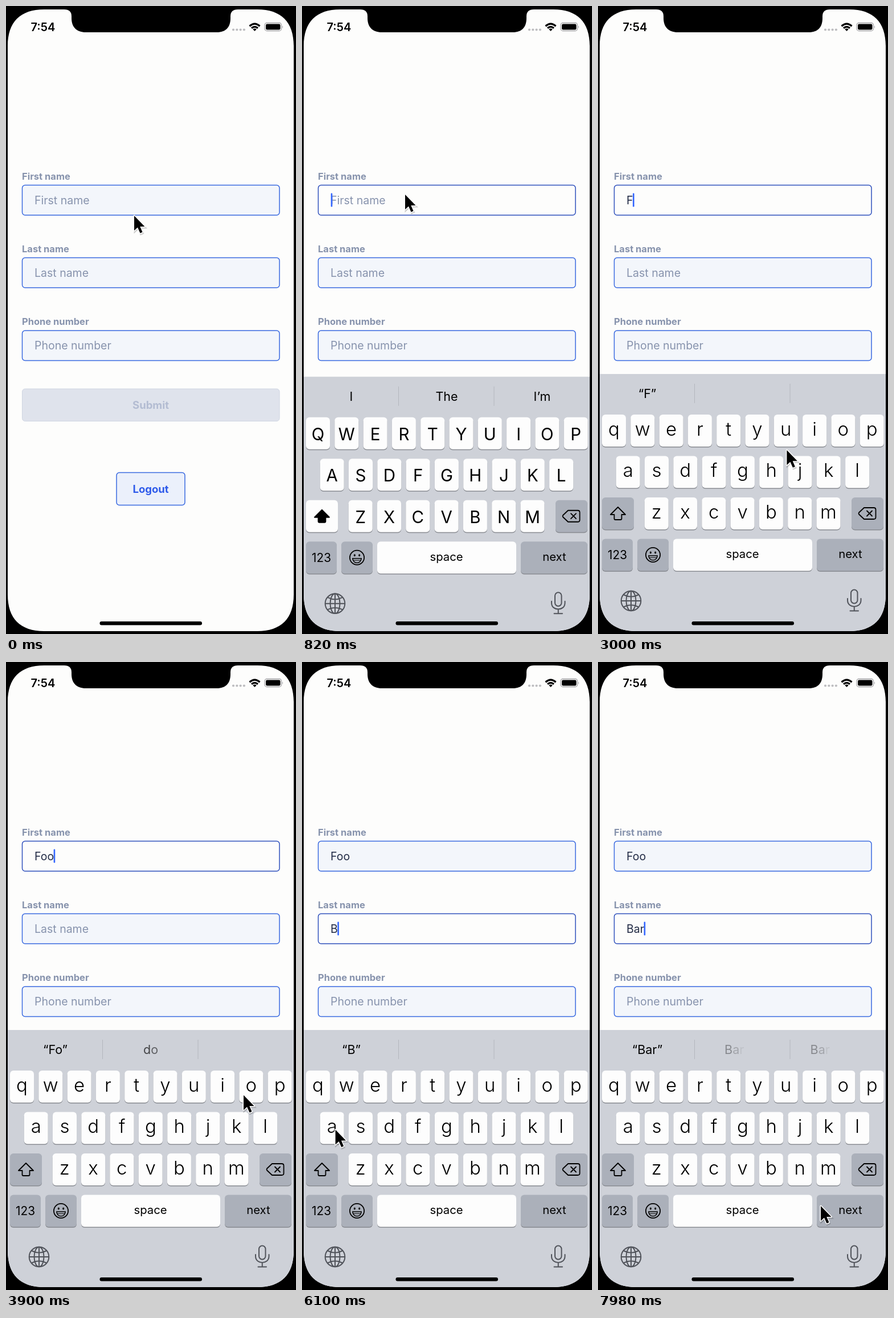
Write an HTML page that moves like this. It is 509 px wide and 1099 px high and loops after 8000 ms.

```html
<!DOCTYPE html>
<html lang="en">
<head>
<meta charset="utf-8">
<title>Form with keyboard</title>
<style>
  html, body { margin: 0; width: 100%; height: 100%; overflow: hidden; background: #000; }
  svg { display: block; width: 100vw; height: 100vh; }
  text { font-family: Inter, "Liberation Sans", sans-serif; white-space: pre; }
  .mid { text-anchor: middle; }
</style>
</head>
<body>
<svg id="stage" viewBox="0 0 509 1099"></svg>
<script>
const LOOP = 8000;
const FOCUS_FIRST = 460, FOCUS_LAST = 4600;
const PAPER = '#fdfdfc', KEY = '#fdfdfd', DARK_KEY = '#abb0ba';
const BLUE = '#3a6ae0', FOCUS_BLUE = '#2f50bc', MUTED = '#8793ad';

// [time, text]
const FIRST_TYPED = [[0, ''], [2550, 'F'], [3380, 'Fo'], [3760, 'Foo']];
const LAST_TYPED = [[0, ''], [5480, 'B'], [6280, 'Ba'], [7460, 'Bar']];

// One list per suggestion slot
const SUGGESTIONS = [
  [[0, 'I'], [2650, '“F”'], [3580, '“Fo”'], [4020, '“Foo”'], [4620, 'I'], [5600, '“B”'], [6500, '“Ba”'], [7600, '“Bar”']],
  [[0, 'The'], [2650, ''], [3800, 'do'], [4020, 'food'], [4620, 'The'], [5600, ''], [6500, 'Ha'], [7500, ''], [7930, 'Barely']],
  [[0, 'I’m'], [2650, ''], [4020, 'foot'], [4620, 'I’m'], [5600, ''], [7930, 'Barbecue']]
];

// [time, x, y] of the pointer tip
const POINTER = [
  [0, 225, 367], [350, 181, 330], [1050, 181, 330], [1750, 206, 867], [2160, 205, 853],
  [2420, 203, 819], [2700, 203, 819], [3250, 428, 746], [3760, 428, 746], [3900, 417, 758],
  [4450, 438, 963], [4700, 438, 963], [5260, 310, 879], [5400, 305, 887], [5600, 305, 887],
  [6150, 53, 817], [6400, 53, 817], [6920, 129, 770], [7200, 178, 743], [7520, 178, 743],
  [7980, 391, 952]
];

const clamp = v => Math.max(0, Math.min(1, v));
const latest = (list, t) => list.reduce((found, item) => item[0] <= t ? item : found);
const attrs = o => Object.entries(o).map(([k, v]) => `${k}="${v}"`).join(' ');
const rect = (x, y, width, height, rx, more = {}) => `<rect ${attrs({ x, y, width, height, rx, ...more })}/>`;
const text = (x, y, size, content, more = {}) =>
  `<text ${attrs({ x, y, 'font-size': size, ...more })}>${content}</text>`;
const centered = (x, y, size, content, more = {}) => text(x, y, size, content, { class: 'mid', ...more });

function key(x, y, width, fill = KEY, id = '') {
  return rect(x, y + 1.4, width, 56, 6, { fill: '#898c92' }) + rect(x, y, width, 56, 6, { fill, id });
}

function field(id, label, y) {
  return text(28, y - 9.5, 16.5, label, { fill: MUTED, 'font-weight': 700 }) +
    rect(28.5, y + .5, 451.5, 52.5, 5, { id: id + 'Box', 'stroke-width': 1.5 }) +
    text(50, y + 33.8, 19.5, label, { id: id + 'Text' }) +
    rect(50.5, y + 14.5, 2.6, 24, 1.3, { id: id + 'Caret', fill: '#3366ff' });
}

const KEY_ROWS = [['qwertyuiop', 7, 715], ['asdfghjkl', 31.7, 787.5], ['zxcvbnm', 81.7, 860]];
const eachKey = draw => KEY_ROWS.map(([letters, x, y]) =>
  [...letters].map((letter, i) => draw(letter, x + i * 50.3, y)).join('')).join('');

function keyboard() {
  return rect(0, 644, 509, 900, 0, { fill: '#ced1d8' }) +
    `<path id="dividers" d="M169.5 661V695M337 661V695" stroke="#b4b7be"/>` +
    rect(170, 652, 168, 52, 6, { id: 'highlight', fill: '#e6e7ec' }) +
    [86.5, 254, 421.5].map((x, i) => centered(x, 686.3, 21.5, '', { id: 'slot' + i })).join('') +
    eachKey((letter, x, y) => key(x, y, 42)) +
    `<g id="upper">${eachKey((c, x, y) => centered(x + 21, y + 40, 29.5, c.toUpperCase()))}</g>` +
    `<g id="lower" font-weight="300">${eachKey((c, x, y) => centered(x + 21, y + 36.5, 33, c))}</g>` +
    key(7, 860, 56, KEY, 'shiftKey') + key(445, 860, 56, DARK_KEY) +
    key(7, 932.5, 54, DARK_KEY) + key(69, 932.5, 55, DARK_KEY) +
    key(132, 932.5, 244) + key(384, 932.5, 117, DARK_KEY) +
    centered(34, 968, 20.8, '123') + centered(253.5, 966, 20.3, 'space') + centered(443, 966, 20.3, 'next') +
    `<g fill="none" stroke="#000" stroke-width="1.8" stroke-linejoin="round" stroke-linecap="round">
      <path id="shiftIcon" d="M35 877L48 890H41.5V897Q41.5 899 39.5 899H30.5Q28.5 899 28.5 897V890H22Z"/>
      <path d="M467 878H484Q487.5 878 487.5 881.5V894.5Q487.5 898 484 898H467L458 889.5Q457 888 458 886.5ZM472 883.5L481 892.5M481 883.5L472 892.5"/>
      <circle cx="96.5" cy="960.5" r="12.6"/>
      <path d="M88.7 962H104.3Q103 969.8 96.5 969.8T88.7 962Z" stroke-width="1.5"/>
      <path d="M90 965.3H103" stroke-width="1"/>
    </g>
    <ellipse cx="92.3" cy="956.5" rx="1.5" ry="2.1"/><ellipse cx="100.7" cy="956.5" rx="1.5" ry="2.1"/>
    <g fill="none" stroke="#50535a" stroke-width="2" stroke-linecap="round">
      <circle cx="58" cy="1041" r="17.3"/><ellipse cx="58" cy="1041" rx="8.5" ry="17.3"/>
      <path d="M58 1024V1058M41 1041H75M45.5 1030.5Q58 1037 70.5 1030.5M45.5 1051.5Q58 1045 70.5 1051.5"/>
      <rect x="444" y="1021.5" width="11.5" height="24" rx="5.75"/>
      <path d="M438 1037V1040C438 1054.5 461.5 1054.5 461.5 1040V1037M449.75 1051V1058.5M442.5 1058.5H457"/>
    </g>`;
}

function statusBar() {
  return text(43.5, 43.5, 20, '7:54', { 'font-weight': 600 }) +
    [399, 405.3, 411.6, 417.9].map(x => `<circle cx="${x}" cy="41.5" r="2.1" fill="#bdbdc0"/>`).join('') +
    `<g fill="none" stroke="#000" stroke-width="3.2">
      <path d="M427.5 35.2Q436.5 27 445.5 35.2M431 38.8Q436.5 34 442 38.8"/>
    </g><path d="M433.3 40.8Q436.5 38.2 439.7 40.8L436.5 44Z"/>` +
    rect(454, 29.5, 29.5, 14, 4, { fill: 'none', stroke: '#a5a5a8', 'stroke-width': 1.3 }) +
    rect(456, 31.5, 25.5, 10, 2.3) +
    `<path d="M485 34.5Q487 36.5 485 39Z" fill="#a5a5a8"/>`;
}

const ARROW = 'M0 0V26L6 20.5L10.5 30.5L14.5 28.8L10.3 19H18.5Z';

document.getElementById('stage').innerHTML = `
  <defs><clipPath id="screen">
    <path d="M3 70C3 28 25 6 67 6H102Q115 6 115 18V21C115 37 124 46 140 46H370C386 46 394 37 394 21V18Q394 6 407 6H441C483 6 505 28 505 70V1030C505 1072 483 1094 441 1094H67C25 1094 3 1072 3 1030Z"/>
  </clipPath></defs>
  <rect width="509" height="1099"/>
  <g clip-path="url(#screen)">
    <rect width="509" height="1099" fill="${PAPER}"/>
    ${statusBar()}
    ${field('first', 'First name', 313)}
    ${field('last', 'Last name', 440)}
    ${field('phone', 'Phone number', 567.5)}
    ${rect(28.5, 670, 451.5, 56.5, 5, { fill: '#dfe3ec', stroke: '#cfd5e2' })}
    ${centered(254, 705, 18.5, 'Submit', { fill: '#b3bcd2', 'font-weight': 700 })}
    ${rect(194, 816.5, 120, 57, 5, { fill: '#ebf0fb', stroke: BLUE, 'stroke-width': 1.5 })}
    ${centered(254, 851.5, 18.5, 'Logout', { fill: '#2f5bea', 'font-weight': 700 })}
    <g id="keyboard">${keyboard()}</g>
    ${rect(164.5, 1077, 179.5, 6.5, 3.25)}
  </g>
  <g id="pointer">
    <path d="${ARROW}" transform="translate(1 2)" opacity=".18" stroke="#000" stroke-width="3"/>
    <path d="${ARROW}" stroke="#fff" stroke-width="3" paint-order="stroke" stroke-linejoin="round"/>
  </g>`;

const ui = {};
document.querySelectorAll('[id]').forEach(node => ui[node.id] = node);
const set = (id, values) => Object.entries(values).forEach(([k, v]) => ui[id].setAttribute(k, v));
const show = (id, visible) => set(id, { visibility: visible ? 'visible' : 'hidden' });

// Fades out for part of each blink, restarting with every keystroke
function caretOpacity(age) {
  const phase = age % 1100;
  return phase < 720 ? 1 : phase < 820 ? 1 - (phase - 720) / 100 : clamp((phase - 1000) / 100);
}

function updateField(id, label, typed, focused, age) {
  set(id + 'Box', { fill: focused ? PAPER : '#f3f6fb', stroke: focused ? FOCUS_BLUE : BLUE });
  const node = ui[id + 'Text'], content = typed || label;
  if (node.textContent !== content) node.textContent = content;
  set(id + 'Text', { fill: typed ? '#222b45' : MUTED });
  const end = typed ? 50 + node.getComputedTextLength() - .5 : 50.7;
  set(id + 'Caret', { x: end, opacity: focused ? caretOpacity(age) : 0 });
}

function updateSuggestion(slot, t) {
  const [since, words] = latest(SUGGESTIONS[slot], t);
  const letters = [...words].map((letter, i) => {
    const alpha = since ? clamp((t - since - i * 20) / 150) : 1;
    return `<tspan fill-opacity="${alpha}">${letter}</tspan>`;
  });
  ui['slot' + slot].innerHTML = letters.join('');
}

function pointerAt(t) {
  const next = POINTER.findIndex(p => p[0] > t);
  if (next < 0) return POINTER[POINTER.length - 1].slice(1);
  const [t0, x0, y0] = POINTER[next - 1], [t1, x1, y1] = POINTER[next];
  const u = (t - t0) / (t1 - t0), eased = u * u * (3 - 2 * u);
  return [x0 + (x1 - x0) * eased, y0 + (y1 - y0) * eased];
}

function render(t) {
  const first = latest(FIRST_TYPED, t), last = latest(LAST_TYPED, t);
  const onLast = t >= FOCUS_LAST, onFirst = t >= FOCUS_FIRST && !onLast;
  updateField('first', 'First name', first[1], onFirst, t - Math.max(first[0], FOCUS_FIRST));
  updateField('last', 'Last name', last[1], onLast, t - Math.max(last[0], FOCUS_LAST));
  updateField('phone', 'Phone number', '', false, 0);

  // Critically damped spring
  const spring = Math.max(0, t - FOCUS_FIRST) * .01826;
  set('keyboard', { transform: `translate(0 ${455 * (1 + spring) * Math.exp(-spring)})` });

  const upper = !(onLast ? last : first)[1];
  set('upper', { display: upper ? 'inline' : 'none' });
  set('lower', { display: upper ? 'none' : 'inline' });
  set('shiftKey', { fill: upper ? KEY : DARK_KEY });
  set('shiftIcon', { fill: upper ? '#000' : 'none' });

  const highlighted = t >= 6600 && t < 7500;
  show('highlight', highlighted);
  show('dividers', !highlighted);
  SUGGESTIONS.forEach((_, slot) => updateSuggestion(slot, t));
  set('pointer', { transform: `translate(${pointerAt(t)})` });
}

const start = performance.now();
function tick() {
  render((performance.now() - start) % LOOP);
  requestAnimationFrame(tick);
}
tick();
</script>
</body>
</html>
```
